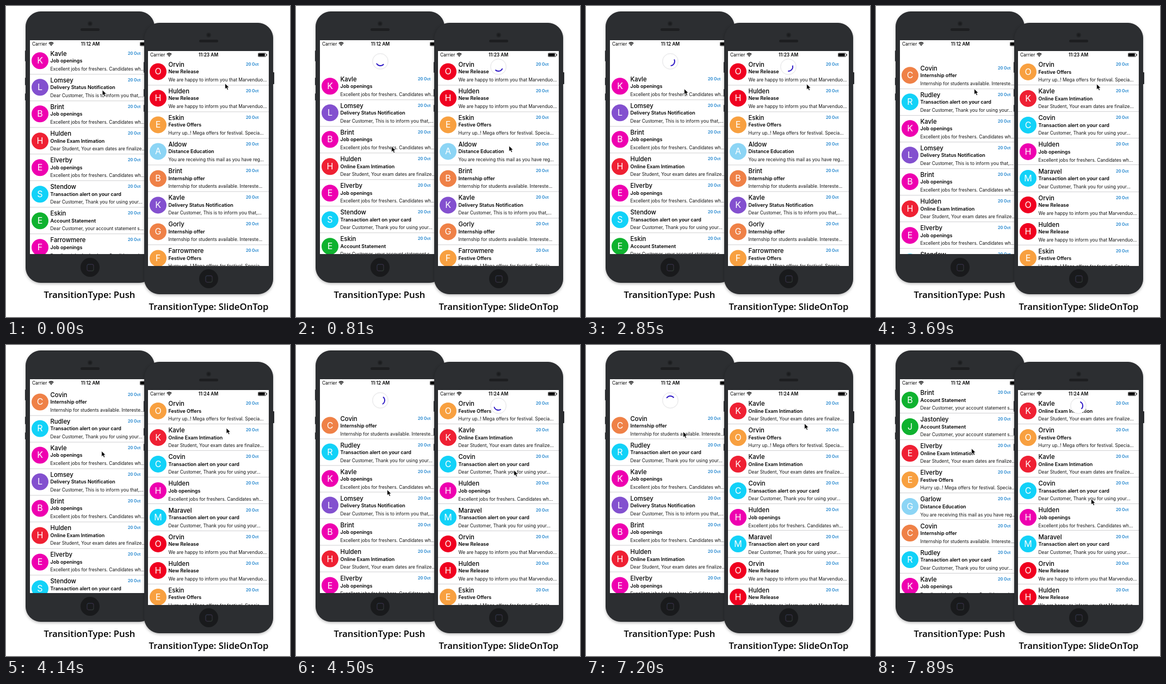
An HTML page that plays this animation: 522x573 px, repeating every 7920 ms.

```html
<!DOCTYPE html>
<html lang="en">
<head>
<meta charset="utf-8">
<title>Pull to refresh</title>
<style>
html, body { margin: 0; width: 100%; height: 100%; overflow: hidden; background: #fff; }
#stage { position: relative; width: 522px; height: 573px; overflow: hidden; font-family: Inter, "Open Sans", sans-serif; color: #000; }
#stage div, #stage svg { position: absolute; white-space: nowrap; box-sizing: border-box; }
.phone { width: 238px; height: 500px; }
.body { inset: 0 1px 0 0; border-radius: 28px; background: #2c2e31; border: 1px solid #2a2c2f; box-shadow: 0 2px 5px rgba(0,0,0,.28); }
.key { width: 3px; background: #2c2e31; border-radius: 1px; }
.lens { left: 114px; top: 18px; width: 9px; height: 9px; border-radius: 50%; background: #1b1c1e; border: 2px solid #232527; }
.slot { left: 101px; top: 31px; width: 35px; height: 5px; border-radius: 3px; background: #1d1e20; }
.home { left: 101px; top: 454px; width: 35px; height: 35px; border-radius: 50%; background: #191a1c; }
.screen { width: 222px; background: #fff; overflow: hidden; }
.list { left: 0; top: 13px; width: 222px; bottom: 0; overflow: hidden; }
.rows { left: 0; top: 1px; width: 222px; }
.row { left: 0; width: 222px; height: 49.1px; border-bottom: 1px solid #cfcfd1; }
.face { left: 3px; top: 8.5px; width: 31px; height: 31px; border-radius: 50%; color: #fff; font-size: 16px; line-height: 31px; text-align: center; }
.name { left: 37.5px; top: 3px; font-size: 11.3px; font-weight: 500; line-height: 16px; }
.subject { left: 37.5px; top: 17.5px; font-size: 9px; font-weight: 600; line-height: 14px; }
.preview { left: 37.5px; top: 32.2px; font-size: 8.37px; line-height: 14px; color: #111; }
.date { right: 18.5px; top: 4px; font-size: 7.2px; font-weight: 700; line-height: 14px; color: #2a8ad0; }
.status { top: 0; left: 0; width: 222px; height: 14px; font-size: 8.4px; line-height: 14px; }
.carrier { left: 4px; }
.clock { left: 0; width: 222px; text-align: center; font-weight: 600; }
.caption { font: 600 16.8px/22px "Open Sans", "Noto Sans", sans-serif; text-align: center; width: 240px; }
</style>
</head>
<body>
<div id="stage"></div>
<script>
const LOOP = 7920, PITCH = 49.1, PULL = 47;
const stage = document.getElementById('stage');

const kinds = {
  job: ['#ee00b0', 'Job openings', 'Excellent jobs for freshers. Candidates wh...'],
  dlv: ['#8350cf', 'Delivery Status Notification', 'Dear Customer, This is to inform you that,...'],
  exam: ['#ef2033', 'Online Exam Intimation', 'Dear Student, Your exam dates are finalize...'],
  card: ['#12d2f8', 'Transaction alert on your card', 'Dear Customer, Thank you for using your...'],
  acct: ['#0fb22f', 'Account Statement', 'Dear Customer, your account statement s...'],
  rel: ['#f00020', 'New Release', 'We are happy to inform you that Marvenduo...'],
  fest: ['#f8a040', 'Festive Offers', 'Hurry up..! Mega offers for festival. Specia...'],
  dist: ['#8cd5f5', 'Distance Education', 'You are receiving this mail as you have reg...'],
  intern: ['#ef8147', 'Internship offer', 'Internship for students available. Intereste...']
};

// Newest mail first; "start" tells which row is on top after each refresh.
const phones = [
  {
    x: 36, y: 10, sx: 44, sy: 63, sh: 394, speed: .497,
    mails: `Brint acct, Jastonley acct, Elverby exam, Elverby fest, Garlow dist,
      Covin intern, Rudley card, Kavle job, Lomsey dlv, Brint job, Hulden exam,
      Elverby job, Stendow card, Eskin acct, Farrowmere job`,
    start: [[0, 7], [3600, 5], [7300, 0]],
    clock: [[0, '11:12 AM']],
    pull: [[150, 0], [650, 1], [3600, 1], [3800, 0], [4080, 0], [4420, 1], [7330, 1], [7530, 0]],
    spins: [[150, 3600, 810, 95], [4080, 7300, 4500, 5]],
    push: true,
    cursor: [[100, 176.5, 154], [700, 175, 258], [1000, 175, 258], [1600, 180, 152], [3900, 180, 152],
      [4480, 167, 266], [4950, 167, 266], [5500, 178, 159], [7600, 178, 159], [7890, 175, 190]]
  },
  {
    x: 254, y: 31, sx: 261, sy: 83, sh: 396, speed: .51,
    mails: `Kavle exam, Orvin fest, Kavle exam, Covin card, Hulden job, Maravel card,
      Orvin rel, Hulden rel, Eskin fest, Aldow dist, Brint intern, Kavle dlv,
      Gorly intern, Farrowmere fest`,
    start: [[0, 6], [3150, 1], [6850, 0]],
    clock: [[0, '11:23 AM'], [4080, '11:24 AM']],
    pull: [[150, 0], [650, 1], [3150, 1], [3160, 0], [4100, 0], [4450, 1], [6850, 1], [6860, 0], [7450, 0], [7800, 1]],
    spins: [[150, 3150, 810, 78], [4100, 6850, 4500, 110], [7450, LOOP, 7890, -10]],
    push: false,
    cursor: [[100, 402, 142], [750, 391, 257], [1000, 391, 257], [1600, 405, 143], [4050, 405, 143],
      [4500, 400, 230], [4700, 399, 255], [4950, 399, 255], [5550, 401, 144], [7400, 401, 144], [7860, 395, 283]]
  }
];

function add(parent, cls, text = '', style = '') {
  const el = document.createElement('div');
  el.className = cls;
  el.textContent = text;
  el.style.cssText = style;
  parent.append(el);
  return el;
}

function addSvg(parent, w, h, style, inner) {
  parent.insertAdjacentHTML('beforeend',
    `<svg width="${w}" height="${h}" viewBox="0 0 ${w} ${h}" style="${style}">${inner}</svg>`);
  return parent.lastElementChild;
}

const at = (left, top) => `left:${left}px;top:${top}px;`;

function buildStatus(screen) {
  const bar = add(screen, 'status');
  add(bar, 'carrier', 'Carrier');
  addSvg(bar, 10, 8, at(33.5, 3), `<g fill="none" stroke="#000" stroke-width="1.3">
    <path d="M.7 3Q5-1 9.3 3M2.3 4.8Q5 2.3 7.7 4.8"/></g><path d="M3.4 5.9Q5 4.6 6.6 5.9L5 7.6z"/>`);
  addSvg(bar, 18, 8, at(202, 3), `<rect x=".4" y=".9" width="14.6" height="6.4" rx="1.3" fill="none" stroke="#000" stroke-width=".8"/>
    <rect x="1.2" y="1.6" width="11.6" height="5" rx=".6"/><rect x="15.8" y="2.8" width="1.2" height="2.6" rx=".6"/>`);
  return add(bar, 'clock');
}

function buildPhone(p, id) {
  const shell = add(stage, 'phone', '', at(p.x, p.y));
  for (const [top, h] of [[72, 20], [122, 14], [151, 13]]) add(shell, 'key', '', `${at(-1.5, top)}height:${h}px`);
  add(shell, 'key', '', `${at(235.5, 91)}height:22px`);
  for (const part of ['body', 'lens', 'slot', 'home']) add(shell, part);
  addSvg(shell, 14, 14, at(111.5, 464.5), `<defs><linearGradient id="rim${id}" x2="1" y2="1">
    <stop stop-color="#2a3644"/><stop offset=".5" stop-color="#352b42"/><stop offset="1" stop-color="#2c382e"/></linearGradient></defs>
    <rect x="1" y="1" width="12" height="12" rx="3" fill="none" stroke="url(#rim${id})" stroke-width="1.3"/>`);

  const screen = add(stage, 'screen', '', `${at(p.sx, p.sy)}height:${p.sh}px`);
  p.clockEl = buildStatus(screen);
  const list = add(screen, 'list');
  p.rowsEl = add(list, 'rows');
  p.rows = p.mails.split(',').map((mail, i) => {
    const [name, kind] = mail.trim().split(' ');
    const [color, subject, preview] = kinds[kind];
    const row = add(p.rowsEl, 'row', '', `top:${i * PITCH}px`);
    add(row, 'face', name[0], `background:${color}`);
    add(row, 'name', name);
    add(row, 'subject', subject);
    add(row, 'preview', preview);
    add(row, 'date', '20 Oct');
    return row;
  });
  p.spinner = addSvg(list, 36, 36, at(93, 0), `<circle cx="18" cy="18" r="15.2" fill="#000" opacity=".04"/>
    <circle cx="18" cy="18" r="14.2" fill="#fff" stroke="#e6e6e8"/>
    <path fill="none" stroke="#2a14c4" stroke-width="1.9"/>`);
  p.arc = p.spinner.querySelector('path');
}

function buildCursor(p) {
  p.cursorEl = addSvg(stage, 10, 15, at(0, 0),
    `<path d="M.6.8V11L3 8.8 4.7 12.6 6.6 11.8 4.9 8.1H8z" fill="#000" stroke="#fff" stroke-width=".7"/>`);
}

// Value in force at time t in a table of [time, value].
const held = (steps, t) => steps.filter(s => s[0] <= t).pop()[1];

// Eased value of column k in a table of [time, ...values].
function tween(keys, t, k = 1) {
  const i = keys.findIndex(s => s[0] > t);
  if (i === 0) return keys[0][k];
  if (i < 0) return keys[keys.length - 1][k];
  const a = keys[i - 1], b = keys[i];
  const u = (t - a[0]) / (b[0] - a[0]);
  return a[k] + (b[k] - a[k]) * u * u * (3 - 2 * u);
}

function arcPath(mid, span) {
  const point = deg => {
    const r = deg * Math.PI / 180;
    return `${18 + 8 * Math.cos(r)} ${18 + 8 * Math.sin(r)}`;
  };
  return `M${point(mid - span / 2)}A8 8 0 0 1 ${point(mid + span / 2)}`;
}

function drawPhone(p, t) {
  const start = held(p.start, t), pull = tween(p.pull, t);
  const shift = p.push ? pull * PULL : 0;
  p.rowsEl.style.transform = `translateY(${shift - start * PITCH}px)`;
  p.rows.forEach((row, i) => row.style.visibility = i < start ? 'hidden' : 'visible');
  p.clockEl.textContent = held(p.clock, t);

  const spin = p.spins.find(s => t >= s[0] && t < s[1]);
  p.spinner.style.visibility = spin && pull > 0 ? 'visible' : 'hidden';
  if (spin) {
    const rest = p.push ? 8 : -2;
    p.spinner.style.transform = `translateY(${rest - (1 - pull) * PULL}px)`;
    p.arc.setAttribute('d', arcPath(spin[3] + p.speed * (t - spin[2]), 5 + 107 * pull));
  }
  p.cursorEl.style.transform = `translate(${tween(p.cursor, t)}px,${tween(p.cursor, t, 2)}px)`;
}

phones.forEach(buildPhone);
phones.forEach(buildCursor);
add(stage, 'caption', 'TransitionType: Push', at(33.5, 521));
add(stage, 'caption', 'TransitionType: SlideOnTop', at(252.5, 543));

function frame() {
  const t = performance.now() % LOOP;
  phones.forEach(p => drawPhone(p, t));
  requestAnimationFrame(frame);
}
frame();
</script>
</body>
</html>
```
